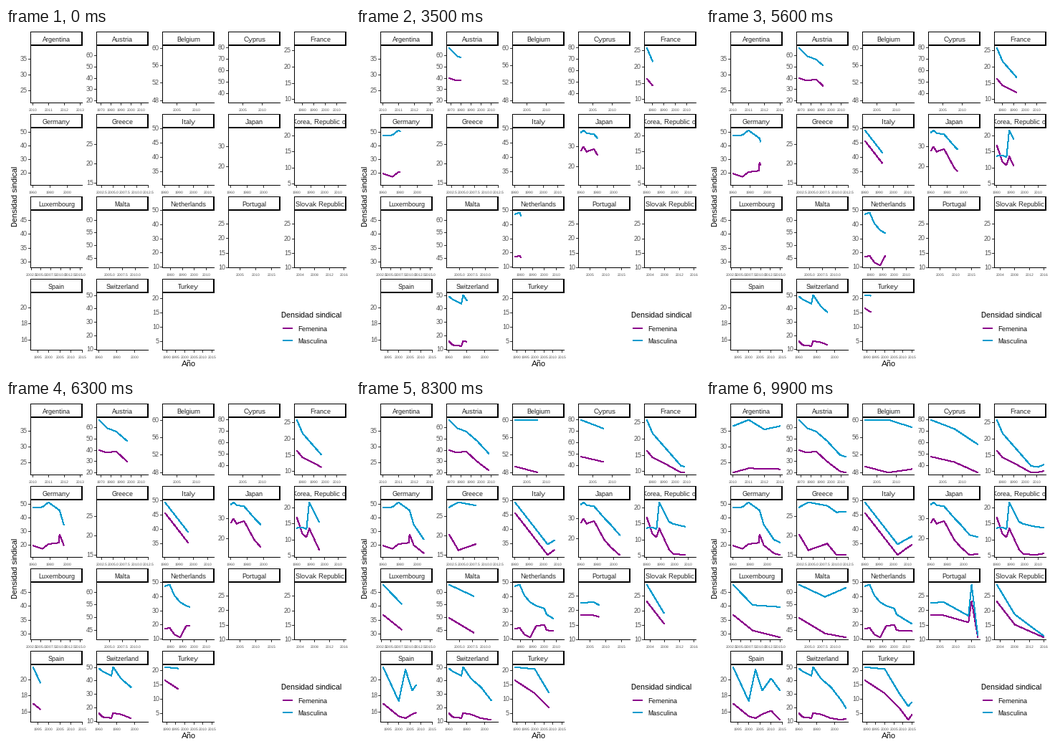
Write a matplotlib script that moves like this. It is 480 px wide and 480 px high and loops after 10 s.

```python
import numpy as np
import matplotlib.pyplot as plt
from matplotlib.animation import FuncAnimation
from matplotlib.patches import Rectangle

plt.rcParams.update({
    "font.family": "Liberation Sans",
    "text.hinting": "native",
    "text.hinting_factor": 1,
})

SIZE, DPI = 480, 72
FRAMES, INTERVAL = 100, 100
FIRST, LAST = 1960, 2017
WOMEN, MEN = "#8B008B", "#009ACD"
TICK, LABEL = "#333333", "#4D4D4D"

fig = plt.figure(figsize=(SIZE / DPI, SIZE / DPI), dpi=DPI, facecolor="white")
ax = fig.add_axes([0, 0, 1, 1])
ax.set_xlim(0, SIZE)
ax.set_ylim(SIZE, 0)
ax.axis("off")

curves = []


def box(x, y, w, h, color="black"):
    return ax.add_patch(Rectangle((x, y), w, h, fc=color, ec="none", lw=0))


def write(x, y, s, size, color="black", ha="center", **kw):
    return ax.text(x, y, s, fontsize=size, color=color, ha=ha,
                   va="baseline", **kw)


def curve(color):
    # Unsmoothed strokes fill each pixel they touch, so width 1 shows as 2.
    return ax.plot([], [], color=color, lw=1, antialiased=False, snap=False,
                   solid_capstyle="butt", solid_joinstyle="bevel")[0]


def ticks(lo, hi, step):
    pad = 0.05 * (hi - lo) + 1e-6
    return np.arange(np.ceil((lo - pad) / step),
                     np.floor((hi + pad) / step) + 1) * step


def panel(name, xstep, ystep, years, women, men):
    """Draw the next facet; its scales follow the data."""
    row, col = divmod(panel.count, 5)
    panel.count += 1
    left, top = 34 + 92 * col, 5 + 115 * row
    bottom = top + 99

    x0, x1 = years[0], years[-1]
    y0, y1 = min(women + men), max(women + men)

    def px(year):
        return left + 3.8 + 65.5 * (np.asarray(year) - x0) / (x1 - x0)

    def py(value):
        return top + 96.3 - 73.6 * (np.asarray(value) - y0) / (y1 - y0)

    strip = box(left, top, 73, 20)
    box(left + 1, top + 1, 70, 17, "white")
    title = write(left + 36.5, top + 14, name, 9, "#1A1A1A", clip_on=True)
    title.set_clip_path(strip)

    for v in ticks(y0, y1, ystep):
        y = int(py(v))
        box(left - 3, y, 3, 1, TICK)
        write(left - 4, y + 3, f"{v:.0f}", 9, LABEL, "right")
    for v in ticks(x0, x1, xstep):
        x = int(px(v))
        box(x, bottom + 1, 1, 3, TICK)
        text = f"{v:.1f}" if xstep == 2.5 else f"{v:.0f}"
        write(x + 0.5, bottom + 12, text, 5, LABEL)
    box(left, top + 20, 1, 80)
    box(left, bottom, 73, 1)

    for values, color in ((women, WOMEN), (men, MEN)):
        curves.append((curve(color), np.array(years), px(years), py(values)))


panel.count = 0

# Key points: years, women's density, men's density.
panel("Argentina", 1, 5, [2010, 2011, 2012, 2013],
      [21.7, 23.1, 22.9, 22.8], [36.7, 38.7, 35.6, 36.7])
panel("Austria", 10, 10, [1968, 1976, 1985, 1996, 2009, 2015],
      [40, 37.8, 39, 30, 21.3, 20.1], [66.9, 59.6, 56.6, 48.3, 35.8, 34])
panel("Belgium", 5, 4, [2002, 2008, 2014],
      [49.4, 48, 48.8], [60.1, 60.1, 58.4])
panel("Cyprus", 5, 10, [2002, 2008, 2014],
      [48, 43.3, 34.2], [79.8, 72, 58.6])
panel("France", 10, 5, [1975, 1980, 1990, 2005, 2011, 2016],
      [16.4, 14.3, 12.6, 9.7, 9.8, 10.2],
      [25.8, 21.7, 17.7, 11.7, 11.4, 12.1])

panel("Germany", 20, 10, [1960, 1971, 1978, 1990, 1991, 1996, 2008, 2015],
      [19.7, 17.4, 20.8, 21.8, 28, 20, 14, 12.8],
      [47.4, 48, 51.5, 46, 45.6, 35, 24, 22])
panel("Greece", 2.5, 5, [2002, 2004, 2008, 2010, 2012],
      [20.4, 16.3, 18, 15.05, 15.05], [27.4, 28.7, 27.8, 26.1, 26.3])
panel("Italy", 10, 5, [1980, 2003, 2008, 2013],
      [45.8, 31.1, 33, 34.7], [49.5, 34.8, 36.3, 37.6])
panel("Japan", 20, 10, [1960, 1963, 1967, 1976, 1988, 1996, 2007, 2017],
      [27.9, 30.1, 27.5, 28.9, 19.7, 15.9, 11.9, 12.5],
      [37.1, 38.2, 36.7, 36.2, 30.5, 27.1, 21.9, 20.9])
panel("Korea, Republic of", 10, 5,
      [1980, 1984, 1987, 1989, 1996, 1999, 2008, 2014],
      [17, 11.9, 10.8, 13.6, 7, 5.6, 5.2, 5.7],
      [13.7, 13.9, 13.3, 21.8, 15.7, 15, 14.1, 13.8])

panel("Luxembourg", 2.5, 5, [2003, 2008, 2015],
      [36.9, 31.3, 28.8], [47.7, 40.4, 39.7])
panel("Malta", 2.5, 5, [2003, 2008, 2012],
      [49.9, 43.7, 42.15], [63, 58.2, 61.8])
panel("Netherlands", 10, 10,
      [1975, 1979, 1983, 1988, 1993, 2000, 2002, 2015],
      [17, 17.8, 13.1, 10.9, 19, 20, 16, 15.4],
      [47.5, 48.6, 41, 36, 33.6, 31.5, 27.3, 20.6])
panel("Portugal", 5, 5, [2002, 2006, 2014, 2015, 2017],
      [18.4, 18.4, 15.9, 23.3, 10.7], [22.6, 23, 18.2, 29, 11.3])
panel("Slovak Republic", 4, 5, [2003, 2008, 2016],
      [23.2, 15.2, 10.8], [29, 18.7, 11.3])

panel("Spain", 5, 2, [1993, 2000, 2003, 2006, 2010, 2014],
      [17.05, 15.45, 15.2, 15.7, 16.15, 15],
      [21.6, 17.35, 21.3, 18.65, 20.2, 18.65])
panel("Switzerland", 20, 10,
      [1960, 1964, 1974, 1976, 1985, 1996, 2008, 2013],
      [16, 13.2, 12.4, 16.2, 15.1, 12.3, 11.1, 12],
      [49.2, 47, 43.8, 50.2, 41.5, 35.4, 25.2, 19.7])
panel("Turkey", 5, 5, [1989, 2000, 2008, 2013, 2015],
      [16.5, 12, 7, 2.8, 4.6], [21.1, 20.4, 12, 7.5, 9])

write(254.5, 472.5, "Año", 11)
write(16, 235, "Densidad sindical", 11, rotation=90, rotation_mode="anchor")
write(384.5, 404, "Densidad sindical", 11, ha="left")
for y, text, color in ((418, "Femenina", WOMEN), (435, "Masculina", MEN)):
    box(386, y, 14, 2, color)
    write(407.5, y + 5, text, 9, ha="left")


def reveal(i):
    """Show every curve up to the current moment, cutting the last segment."""
    now = FIRST + (LAST - FIRST) * i / (FRAMES - 1)
    for line, t, x, y in curves:
        n = np.searchsorted(t, now, side="right")
        if now - t[0] < 0.3:
            line.set_data([], [])
        else:
            line.set_data(np.append(x[:n], np.interp(now, t, x)),
                          np.append(y[:n], np.interp(now, t, y)))
    return [c[0] for c in curves]


anim = FuncAnimation(fig, reveal, frames=FRAMES, interval=INTERVAL,
                     repeat=True, repeat_delay=0, blit=False)
plt.show()
```
